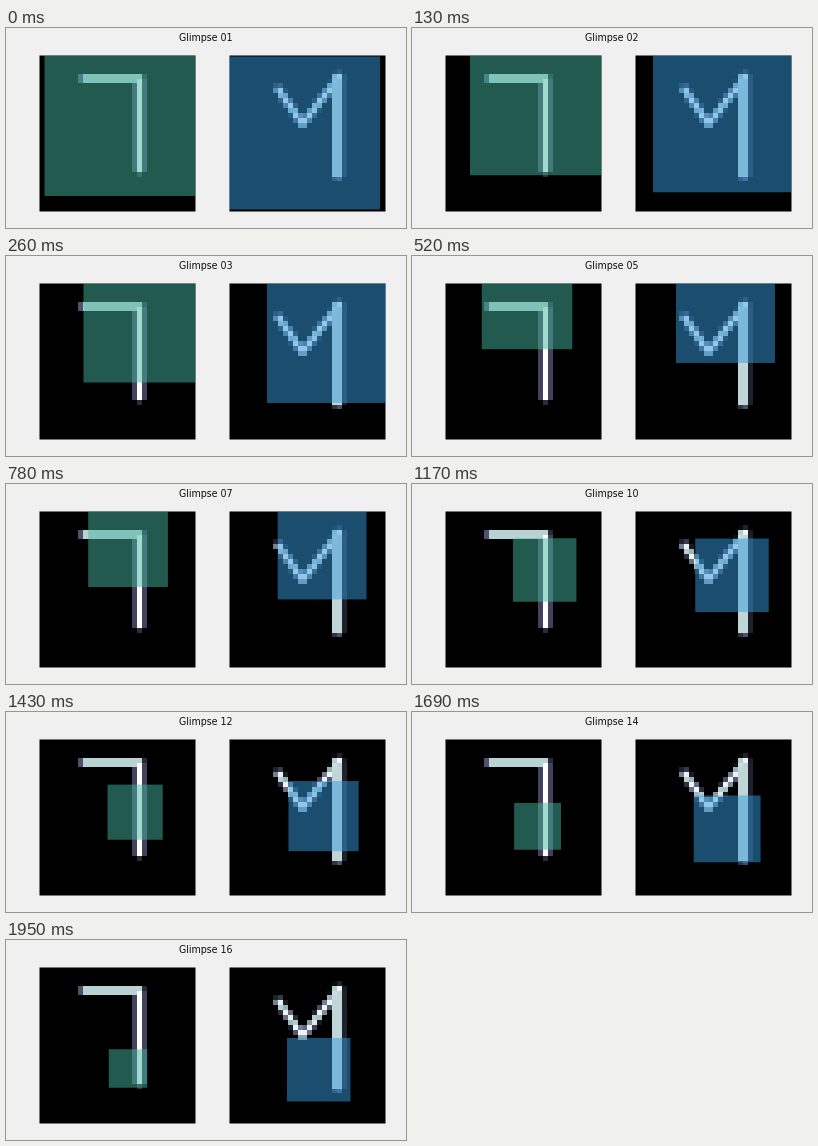
A matplotlib script for the animation above (2080 ms loop, 400 by 200 pixels).

```python
import numpy as np
import matplotlib.pyplot as plt
from matplotlib.animation import FuncAnimation
from matplotlib.patches import Rectangle

W, H, DPI = 400, 200, 100
FRAMES, INTERVAL = 16, 130
GRID = 32
SIDE, TOP = 156, 27.5
CELL = SIDE / GRID
RISE = 0.8  # digits sit slightly above the cell grid
KEY_STEPS = (0, 2, 4, 9, 15)


def stroke(start, end, width, peak=1.0):
    """Line on the grid whose brightness falls off with distance."""
    row, col = np.mgrid[:GRID, :GRID] + 0.5
    (x0, y0), (x1, y1) = start, end
    dx, dy = x1 - x0, y1 - y0
    t = ((col - x0) * dx + (row - y0) * dy) / (dx * dx + dy * dy)
    t = np.clip(t, 0, 1)
    dist = np.hypot(col - x0 - t * dx, row - y0 - t * dy)
    return np.clip(width - dist, 0, peak)


def digit(*strokes):
    return np.max(strokes, axis=0)


class Panel:
    """A digit with a glimpse window gliding through a few key poses."""

    def __init__(self, ax, left, image, color, poses):
        self.left = left
        self.poses = poses
        ax.add_patch(Rectangle((left, TOP), SIDE, SIDE, facecolor="black",
                               lw=0, snap=False))
        # The outer cells are empty, so only the inner ones are drawn.
        x0, x1 = left + CELL, left + SIDE - CELL
        y0, y1 = TOP + CELL - RISE, TOP + SIDE - CELL - RISE
        ax.imshow(image[1:-1, 1:-1], cmap="bone", vmin=0, vmax=1,
                  interpolation="nearest", extent=(x0, x1, y1, y0),
                  aspect="auto", zorder=2)
        self.window = ax.add_patch(
            Rectangle((left, TOP), 1, 1, facecolor=color, alpha=0.5, lw=0,
                      snap=False, zorder=3))

    def update(self, step):
        x, y, size = (np.interp(step, KEY_STEPS, v) for v in zip(*self.poses))
        half = size / 2
        x0, x1 = np.clip((x - half, x + half), self.left, self.left + SIDE)
        y0, y1 = np.clip((y - half, y + half), TOP, TOP + SIDE)
        self.window.set_bounds(x0, y0, x1 - x0, y1 - y0)
        return self.window


fig = plt.figure(figsize=(W / DPI, H / DPI), dpi=DPI, facecolor="#f0f0f0")
ax = fig.add_axes((0, 0, 1, 1))

seven = digit(stroke((9.3, 5), (20.5, 5), 1.3),
              stroke((20.5, 5), (20.5, 23.4), 1.3))
four = digit(stroke((10.1, 7.3), (15, 14.3), 1.15, 0.95),
             stroke((15, 14.3), (22.5, 4.7), 1.15, 0.95),
             stroke((22.15, 4.8), (22.15, 24.4), 1.5, 0.82))

# Poses: window centre and size
panels = [
    Panel(ax, 33.5, seven, (70 / 255, 180 / 255, 158 / 255), [
        (116.5, 90, 156), (135, 69, 115), (115, 48, 90.5),
        (132.7, 86, 63.5), (122, 128.5, 38.5)]),
    Panel(ax, 223.5, four, (55 / 255, 155 / 255, 222 / 255), [
        (297.6, 105, 153), (324, 84, 126), (313.5, 57.5, 99),
        (320, 91.3, 73.5), (312.7, 129.7, 63.5)]),
]
ax.set(xlim=(0, W), ylim=(H, 0))
ax.axis("off")
title = fig.text(0.5, 0.977, "", ha="center", va="top", color="#111111",
                 family="DejaVu Sans", size=6.85)


def update(step):
    title.set_text(f"Glimpse {step + 1:02d}")
    return [title] + [panel.update(step) for panel in panels]


anim = FuncAnimation(fig, update, frames=FRAMES, interval=INTERVAL,
                     repeat=True, repeat_delay=0, blit=False)
plt.show()
```
